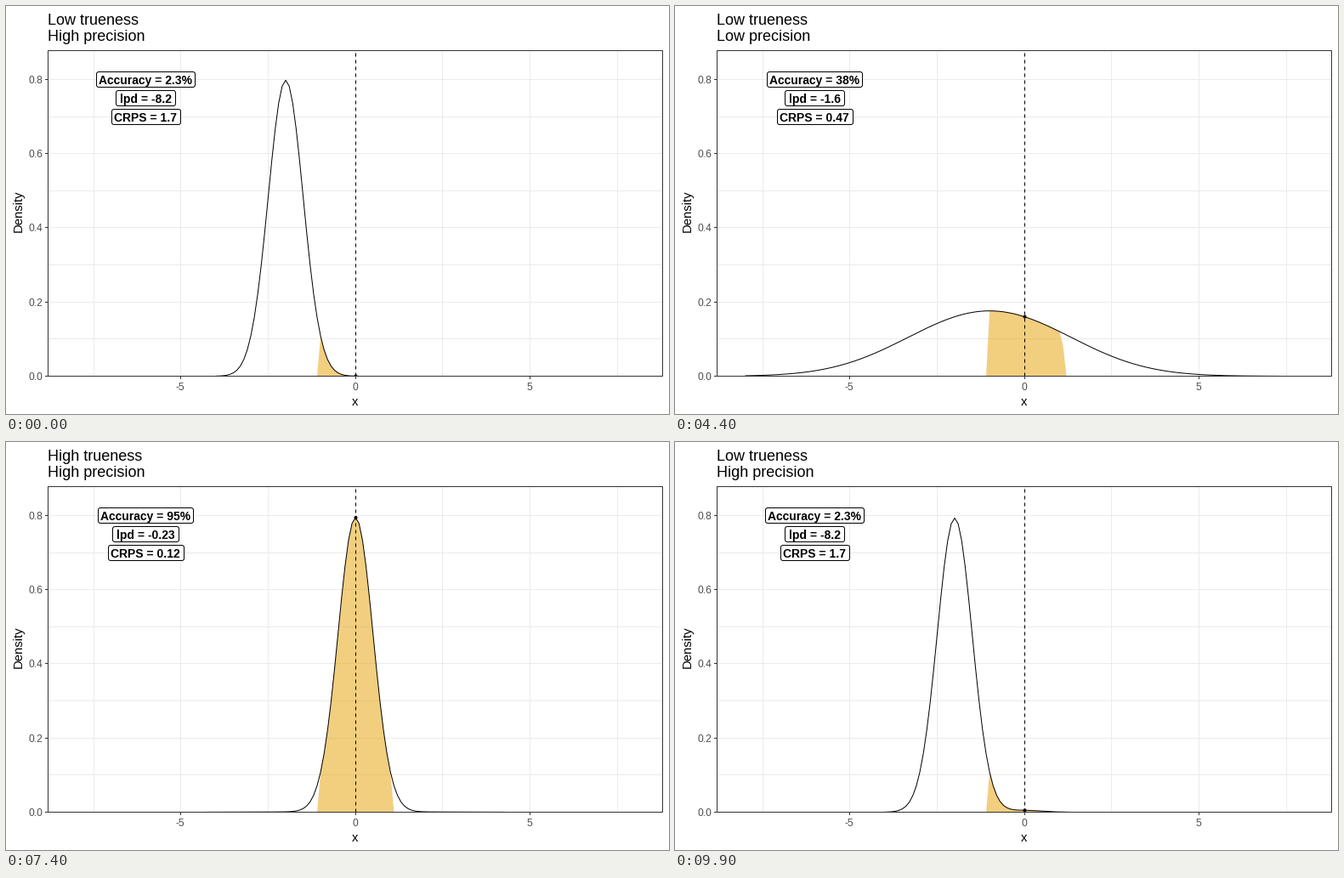
These frames come from a looping animation (780 px wide and 480 px high, 10000 ms). A matplotlib script:

```python
import numpy as np
import matplotlib.pyplot as plt
from matplotlib.animation import FuncAnimation
from matplotlib.patches import Circle, FancyBboxPatch, Polygon, Rectangle

W, H, DPI = 780, 480, 100
PX = 72 / DPI                              # one pixel in points
LEFT, RIGHT, TOP, BASE = 49.5, 772.5, 52.5, 435.5
X_UNIT = (RIGHT - LEFT) / 17.6
Y_UNIT = (BASE - TOP) / (1.1 * 0.79788)
FRAMES, PER_STATE = 100, 25
MIN_DENSITY = 1.2e-4                       # the curve is cut off below this

plt.rcParams["font.family"] = "Liberation Sans"

# mean, sd, right edge of the shaded part, title, labels
STATES = [
    (-2, 0.5, 1.0, "Low", "High", ("2.3%", "-8.2", "1.7")),
    (-2, 2.0, 1.0, "Low", "Low", ("24%", "-2.1", "1.2")),
    (0, 2.0, 1.1, "High", "Low", ("38%", "-1.6", "0.47")),
    (0, 0.5, 1.0, "High", "High", ("95%", "-0.23", "0.12")),
]
GRID = np.linspace(-8, 8, 161)


def px(x):
    return (LEFT + RIGHT) / 2 + 0.2 + np.asarray(x) * X_UNIT


def py(y):
    return BASE - np.asarray(y) * Y_UNIT


def snap(v):
    return np.floor(v) + 0.5


def density(state, x):
    mean, sd = STATES[state][:2]
    return np.exp(-0.5 * ((x - mean) / sd) ** 2) / (sd * np.sqrt(2 * np.pi))


def shaded(state):
    inside = (GRID > -1.05) & (GRID < STATES[state][2] + 0.05)
    return np.where(inside, density(state, GRID), 0)


def ease(t):
    t = min(max(t, 0), 1)
    return 4 * t ** 3 if t < 0.5 else 1 - 4 * (1 - t) ** 3


fig = plt.figure(figsize=(W / DPI, H / DPI), dpi=DPI, facecolor="white")
ax = fig.add_axes([0, 0, 1, 1])
ax.set_xlim(0, W)
ax.set_ylim(H, 0)
ax.axis("off")

panel = Rectangle((LEFT, TOP), RIGHT - LEFT, BASE - TOP, fill=False,
                  ec="#333333", lw=PX, zorder=10, snap=False)
ax.add_patch(panel)
clip = Rectangle((LEFT - 0.5, TOP - 0.5), RIGHT - LEFT + 1, BASE - TOP + 1,
                 transform=ax.transData)


def line(xs, ys, color, z, **kw):
    return ax.plot(xs, ys, color=color, lw=PX, zorder=z, snap=False,
                   solid_capstyle="butt", **kw)[0]


def text(x, y, s, size, color="black", **kw):
    return ax.text(x, y, s, fontsize=size * PX, color=color,
                   va=kw.pop("va", "baseline"), **kw)


# grid, ticks and axis texts
for v in np.arange(-7.5, 8, 2.5):
    x = snap(px(v))
    line([x, x], [TOP, BASE], "#EBEBEB", 1)
    if v % 5 == 0:
        line([x, x], [BASE, BASE + 3.5], "#333333", 9)
        text(x - 0.5, 452.3, f"{v:.0f}", 12, "#4D4D4D", ha="center")
for i in range(9):
    y = snap(py(i / 10))
    line([LEFT, RIGHT], [y, y], "#EBEBEB", 1)
    if i % 2 == 0:
        line([LEFT - 3.5, LEFT], [y, y], "#333333", 9)
        text(43, y + 4.5, f"{i / 10:.1f}", 12, "#4D4D4D", ha="right")
text(410.7, 470, "x", 14.7, ha="center")
text(22, 241, "Density", 14.7, ha="right", va="center", rotation=90)

title = [text(49, 22, "", 18), text(49, 41, "", 18)]

# moving parts
area = Polygon(np.zeros((3, 2)), fc="#E69F00", alpha=0.5, lw=0, zorder=2,
               snap=False)
ax.add_patch(area)
curve = line([], [], "black", 4)
x0 = snap(px(0))
rule = line([x0, x0], [BASE, TOP], "black", 5, dashes=(4, 4),
            dash_capstyle="butt")
dot = Circle((x0, BASE), 2.0, fc="black", lw=0, zorder=6)
ax.add_patch(dot)
for part in (area, curve, rule, dot):
    part.set_clip_path(clip)

# stat labels: name, centre row, and box width by length of the value
NAMES = [("Accuracy", 86.5), ("lpd", 108.5), ("CRPS", 130.5)]
WIDTHS = [{4: 116, 3: 112}, {4: 70, 5: 78}, {3: 81, 4: 89}]
labels = []
for name, row in NAMES:
    box = FancyBboxPatch((0, row - 9), 10, 18, fc="white", ec="black", lw=PX,
                         boxstyle="round,pad=0,rounding_size=2.6", zorder=7,
                         snap=False)
    ax.add_patch(box)
    labels.append((box, text(164.2, row + 5.3, "", 13.9, ha="center",
                             weight="bold", zorder=8)))


def draw(frame):
    now = min(max(frame - 7, 0) // PER_STATE, 3)
    nxt = (now + 1) % 4
    centre = 19 + PER_STATE * now
    span = 14 if now == 0 else 13
    mix = ease(0.5 + (frame - centre) / span)

    def blend(a, b):
        return a + (b - a) * mix

    y = blend(density(now, GRID), density(nxt, GRID))
    fill = blend(shaded(now), shaded(nxt))
    curve.set_data(px(GRID), py(np.where(y > MIN_DENSITY, y, np.nan)))
    area.set_xy(np.vstack([np.column_stack([px(GRID), py(fill)]),
                           [[px(8), BASE], [px(-8), BASE]]]))
    dot.center = (x0, py(y[80]))

    # labels switch at the midpoint, the title one step later
    trueness, precision = STATES[nxt if frame > centre else now][3:5]
    title[0].set_text(f"{trueness} trueness")
    title[1].set_text(f"{precision} precision")
    values = STATES[nxt if frame >= centre else now][5]
    for (box, label), (name, _), widths, value in zip(labels, NAMES, WIDTHS,
                                                      values):
        width = widths[len(value)]
        box.set_x(snap(164.5 - width / 2))
        box.set_width(width)
        label.set_text(f"{name} = {value}")
    return [area, curve, dot]


anim = FuncAnimation(fig, draw, frames=FRAMES, interval=100, repeat=True,
                     repeat_delay=0, init_func=lambda: draw(0), blit=False)
plt.show()
```
